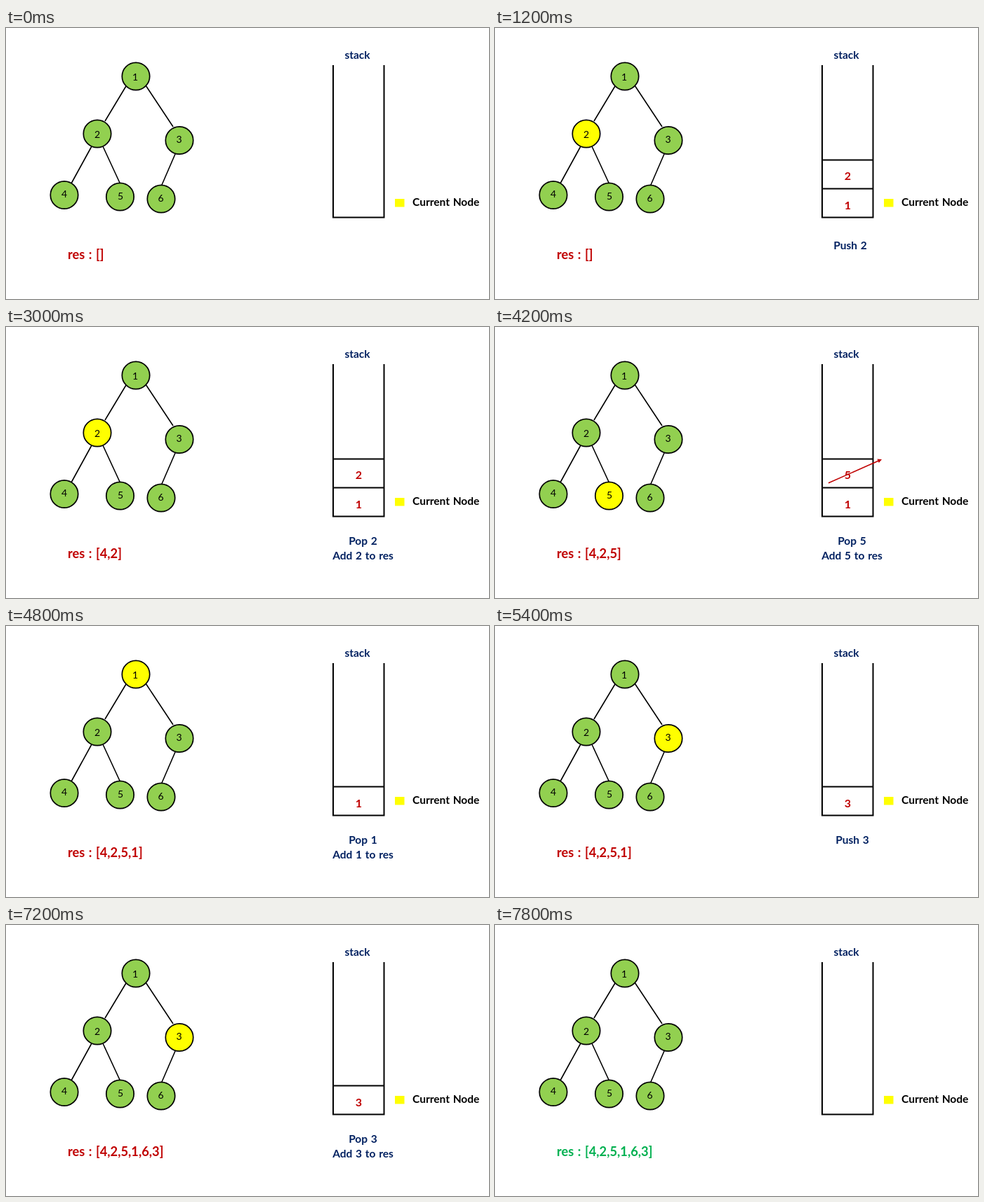
An HTML page for the animation above (8.4 s loop, 688 by 387 pixels).

```html
<!DOCTYPE html>
<html lang="en">
<head>
<meta charset="utf-8">
<title>Inorder traversal with a stack</title>
<style>
  html, body { margin: 0; width: 100%; height: 100%; overflow: hidden; background: #fff; }
  svg { display: block; width: 688px; height: 387px; }
  text { font: bold 15.5px Lato, Carlito, sans-serif; word-spacing: 1px; }
  .mid { text-anchor: middle; }
  .navy { fill: #002060; }
  .edge { stroke: #000; stroke-width: 1.6; }
  .node circle { fill: #92d050; stroke: #000; stroke-width: 1.7; }
  .node.current circle { fill: #ff0; }
  .node text { font-size: 14px; font-weight: normal; }
  .wall { fill: none; stroke: #000; stroke-width: 2; }
  .cell { font-size: 16px; fill: #c00000; }
  #res { font-size: 18.3px; fill: #c00000; }
  #res.done { fill: #00b050; }
  .arrow { fill: #c00000; stroke: #c00000; stroke-width: 1.5; }
</style>
</head>
<body>
<svg viewBox="0 0 688 387">
  <g id="tree"></g>
  <path class="wall" d="M466 53V270.5H538.5V53"/>
  <text class="mid navy" x="500.5" y="43.5">stack</text>
  <rect x="554" y="244" width="13.5" height="11.5" fill="#ff0"/>
  <text x="579" y="253.5">Current Node</text>
  <text id="res" x="88" y="329.5"></text>
  <g id="stack"></g>
  <g id="note"></g>
</svg>
<script>
const STEP = 600;
const ORDER = [4, 2, 5, 1, 6, 3];
const $ = id => document.getElementById(id);

// centre of the circle, then centre of the label
const nodes = {
  1: [185, 69, 184, 70],
  2: [130, 151, 130, 152],
  3: [247, 160.5, 246.5, 159],
  4: [83, 238.5, 83, 237],
  5: [162.5, 241, 163, 240],
  6: [221, 244, 220.5, 242.5]
};
const edges = [
  [171, 83, 141, 133], [199, 82, 238, 141], [122, 169, 93, 222],
  [138, 169, 162, 221], [241, 180, 222, 224]
];

// cell geometry: top line and label centre
const levels = [[229.5, 253], [188.5, 211], [148.5, 170.5]];
const lowCell = [198, 215.5];

const push = (node, stack, found, x, y) =>
  ({ node, stack, found, lines: [[`Push ${node}`, x, y]] });
const pop = (node, stack, found, arrowY) =>
  ({ node, stack, found, arrowY,
     lines: [[`Pop ${node}`, 508.5, 311], [`Add ${node} to res`, 508.5, 331.7]] });
const idle = found => ({ node: 0, stack: [], found, lines: [] });

const steps = [
  idle(0),
  push(1, [1], 0, 506, 325.5),
  push(2, [1, 2], 0, 506, 315.5),
  push(4, [1, 2, 4], 0, 506, 315.5),
  pop(4, [1, 2, 4], 1, 149.5),
  pop(2, [1, 2], 2),
  push(5, [1, 5], 2, 509, 311),
  pop(5, [1, 5], 3, 189),
  pop(1, [1], 4),
  push(3, [3], 4, 509, 311),
  push(6, [3, 6], 4, 509, 311),
  pop(6, [3, 6], 5, 194.5),
  pop(3, [3], 6),
  idle(6)
];

const label = (s, x, y, cls = "") => `<text class="mid ${cls}" x="${x}" y="${y}">${s}</text>`;

function cell(value, level) {
  const [top, mid] = value === 6 ? lowCell : levels[level];
  return `<path class="wall" d="M466 ${top}H538.5"/>` + label(value, 502.5, mid + 5.7, "cell");
}

function arrow(y) {
  return `<g class="arrow" transform="translate(551 ${y})">
    <path d="M-76 33.8L-4 1.8"/><path stroke="none" d="M0 0L-4.2 5L-6.6 -.4Z"/></g>`;
}

$("tree").innerHTML =
  edges.map(([a, b, c, d]) => `<path class="edge" d="M${a} ${b}L${c} ${d}"/>`).join("") +
  Object.entries(nodes).map(([n, [cx, cy, x, y]]) =>
    `<g class="node" id="node${n}"><circle cx="${cx}" cy="${cy}" r="19.7"/>${label(n, x, y + 5)}</g>`
  ).join("");

function show(index) {
  const { node, stack, found, lines, arrowY } = steps[index];
  for (const n in nodes) $("node" + n).classList.toggle("current", +n === node);
  $("res").textContent = `res : [${ORDER.slice(0, found)}]`;
  $("res").classList.toggle("done", index === steps.length - 1);
  $("stack").innerHTML = stack.map(cell).join("") + (arrowY ? arrow(arrowY) : "");
  $("note").innerHTML = lines.map(([s, x, y]) => label(s, x, y, "navy")).join("");
}

let shown = -1;
const start = performance.now();
function tick() {
  const index = Math.floor((performance.now() - start) / STEP) % steps.length;
  if (index !== shown) show(shown = index);
  requestAnimationFrame(tick);
}
tick();
</script>
</body>
</html>
```
